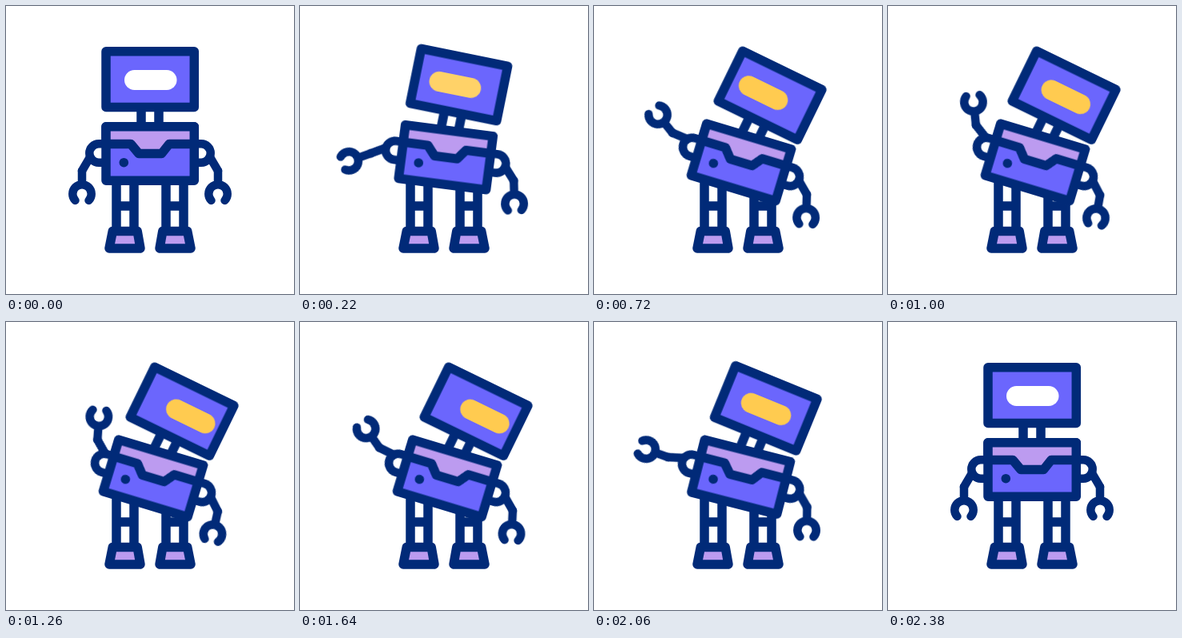
Animation, 360 px wide and 360 px high, one loop 2.4 s. Source, as an HTML page:

```html
<!DOCTYPE html>
<html lang="en">
<head>
<meta charset="utf-8">
<title>Waving robot</title>
<style>
  html, body { margin: 0; width: 100%; height: 100%; overflow: hidden; background: #fff; }
  svg {
    display: block; width: 100%; height: 100%;
    fill: none; stroke: #012a78; stroke-width: 11.5;
    stroke-linecap: round; stroke-linejoin: round;
  }
  .blue { fill: #6b66fd; }
  .pink { fill: #bc9bf0; }
  .thin { stroke-width: 10.5; }

  .torso, .head, .arm, .fore, .visor {
    animation: 2400ms cubic-bezier(.3333, 0, .6667, 1) infinite;
  }
  .torso { --tilt: 16.8deg; transform-origin: 145px 203px; animation-name: lean; }
  .head { --tilt: 9.2deg; transform-origin: 171px 157px; animation-name: lean; }
  .arm { transform-origin: 116px 184px; animation-name: wave; }
  .fore { transform-origin: 95px 206px; animation-name: wave; }
  .visor { stroke: none; animation-name: look, glow; }

  .left .arm { --low: 59deg; --high: 105deg; }
  .left .fore { --low: 58deg; --high: 64deg; }
  .right .arm { --low: 16.8deg; --high: 12.8deg; }
  .right .fore { --low: 0deg; --high: -9deg; }

  @keyframes lean {
    0%, 99.17%, 100% { transform: rotate(0deg); }
    20%, 81.67% { transform: rotate(var(--tilt)); }
  }
  @keyframes wave {
    0%, 99.17%, 100% { transform: rotate(0deg); }
    17.5%, 24%, 76.4%, 80.83% { transform: rotate(var(--low)); }
    49.58% { transform: rotate(var(--high)); }
  }
  @keyframes look {
    0%, 86.67%, 100% { transform: translateX(0); }
    18.33%, 26.67% { transform: translateX(-10.5px); }
    54.17%, 68.33% { transform: translateX(12px); }
  }
  @keyframes glow {
    0%, 99.17%, 100% { fill: #fff; }
    12%, 87% { fill: #ffcb50; }
  }
</style>
</head>
<body>
<svg viewBox="0 0 360 360">
  <defs>
    <g id="leg">
      <path d="M138 218V282M160 218V282M138 250H160"/>
      <path class="pink" d="M133.3 281.5H164.2L168 303H129Z"/>
    </g>
    <path id="ring" class="thin" d="M125 172.3H116A11.7 11.7 0 0 0 116 195.7H125"/>
    <path id="upper" class="thin" d="M105 189L95 206"/>
    <path id="claw" class="thin" d="M95 206V223M86.5 243A11.7 11.7 0 1 1 103.5 243"/>
  </defs>

  <use href="#leg"/>
  <use href="#leg" transform="matrix(-1 0 0 1 360 0)"/>

  <g class="torso">
    <g class="left">
      <use href="#ring"/>
      <g class="arm">
        <use href="#upper"/>
        <g class="fore"><use href="#claw"/></g>
      </g>
    </g>
    <g class="right" transform="matrix(-1 0 0 1 360 0)">
      <use href="#ring"/>
      <g class="arm">
        <use href="#upper"/>
        <g class="fore"><use href="#claw"/></g>
      </g>
    </g>

    <g class="head">
      <path d="M169 126V150M191 126V150"/>
      <rect class="blue" x="125" y="56.8" width="110.3" height="69.6"/>
      <rect class="visor" x="148" y="80" width="65.5" height="25" rx="12.5"/>
    </g>

    <rect class="blue" x="125" y="150.8" width="110.3" height="67.4"/>
    <path class="pink" d="M125 150.8H235.3V172.5H204L194.5 184.5H166L156 172.5H125Z"/>
    <circle cx="147.3" cy="195.7" r="5.8" fill="#012a78" stroke="none"/>
  </g>
</svg>
</body>
</html>
```
